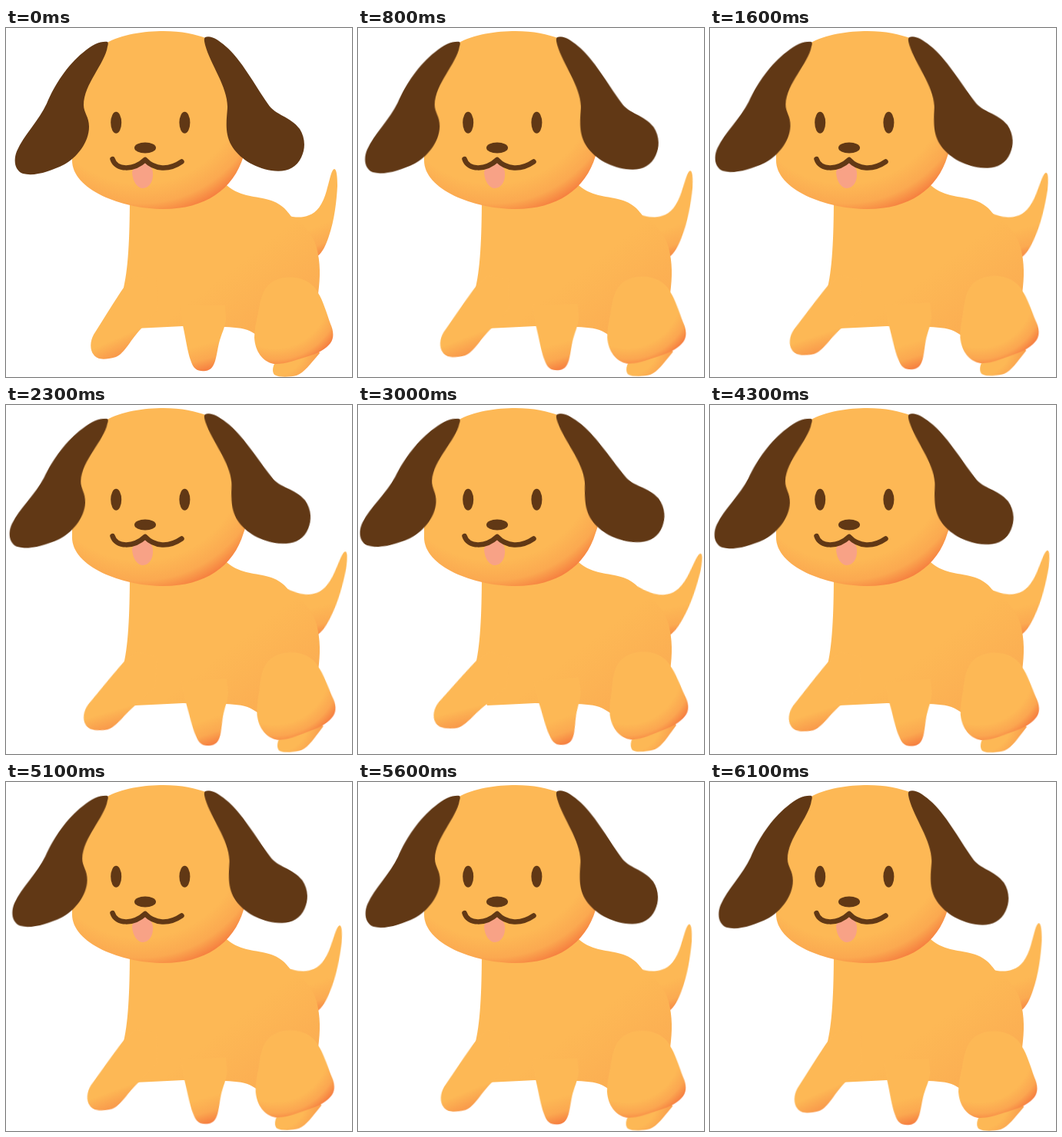
An HTML page that plays this animation: 450x453 px, repeating every 6200 ms.

```html
<!DOCTYPE html>
<html lang="en">
<head>
<meta charset="utf-8">
<title>Puppy</title>
<style>
  html, body { margin: 0; width: 100%; height: 100%; overflow: hidden; background: #fff; }
  svg { display: block; width: 100%; height: 100%; }

  /* Every limb swings linearly out and back, ten poses per second. */
  .sway { animation: sway 6.2s steps(31) infinite; }
  @keyframes sway {
    0%, 100% { transform: rotate(0deg); }
    50% { transform: rotate(var(--a)); }
  }
  .tail      { --a: 11deg;   transform-origin: 384px 288px; }
  .hind      { --a: -4.6deg; transform-origin: 330px 343px; }
  .fore-near { --a: 10deg;   transform-origin: 181px 338px; }
  .fore-far  { --a: -5.6deg; transform-origin: 217px 336px; }
  .ear-left  { --a: 3.6deg;  transform-origin: 129px 20px; }
  .ear-right { --a: -4.7deg; transform-origin: 263px 15px; }
  .dark { fill: #613815; }
</style>
</head>
<body>
<svg viewBox="0 0 450 453">
  <defs>
    <radialGradient id="headFill" gradientUnits="userSpaceOnUse" cx="175" cy="65" r="185">
      <stop offset=".74" stop-color="#fdb855"/>
      <stop offset=".88" stop-color="#fba950"/>
      <stop offset="1" stop-color="#f4743b"/>
    </radialGradient>
    <radialGradient id="thighFill" gradientUnits="userSpaceOnUse" cx="350" cy="346" r="97">
      <stop offset=".72" stop-color="#fdb855"/>
      <stop offset=".87" stop-color="#fba650"/>
      <stop offset="1" stop-color="#f5783e"/>
    </radialGradient>
    <radialGradient id="footFill" gradientUnits="userSpaceOnUse" cx="350" cy="412" r="60">
      <stop offset=".65" stop-color="#fdb855"/>
      <stop offset="1" stop-color="#f99a4b"/>
    </radialGradient>
    <linearGradient id="tailFill" gradientUnits="userSpaceOnUse" x1="398" y1="255" x2="416" y2="298">
      <stop offset=".1" stop-color="#fdb855"/>
      <stop offset=".6" stop-color="#fbaa51"/>
      <stop offset="1" stop-color="#f5793e"/>
    </linearGradient>
    <linearGradient id="nearFill" gradientUnits="userSpaceOnUse" x1="130" y1="396" x2="146" y2="432">
      <stop offset=".3" stop-color="#fdb855"/>
      <stop offset="1" stop-color="#f79048"/>
    </linearGradient>
    <linearGradient id="farFill" gradientUnits="userSpaceOnUse" x1="250" y1="400" x2="262" y2="446">
      <stop offset=".25" stop-color="#fdb855"/>
      <stop offset=".65" stop-color="#fba850"/>
      <stop offset="1" stop-color="#f5793e"/>
    </linearGradient>
    <linearGradient id="bodyFill" gradientUnits="userSpaceOnUse" x1="270" y1="310" x2="340" y2="400">
      <stop offset=".15" stop-color="#fdb855"/>
      <stop offset="1" stop-color="#fbad52"/>
    </linearGradient>
  </defs>

  <path class="sway tail" fill="url(#tailFill)" d="M427 183C423 184 421 198 417 211C412 229 404 240 394 243C387 246 380 246 373 245C366 244 360 242 354 240L362 272L390 296L405 296C411 293 417 280 420 270C427 250 430 225 431 205C431 193 430 183 427 183Z"/>

  <path class="sway hind" fill="url(#footFill)" d="M352 432C346 438 346 447 349 450C355 454 370 453 378 451C388 447 395 437 408 422L400 405L365 410Z"/>

  <path fill="url(#bodyFill)" d="M161 215C161 260 160 308 153 337L158 360L168 390C190 389 210 388 230 387L285 388C300 389 312 389 322 396L345 410L398 380L406 345C409 322 409 305 404 285C399 268 389 256 372 246C365 237 359 227 338 222C315 217 300 217 285 202Z"/>

  <path class="sway fore-near" fill="url(#nearFill)" d="M167 322L153 337C142 353 128 376 114 398C109 407 109 418 114 424C119 431 128 431 143 427C154 423 163 403 176 390L198 364L195 325Z"/>

  <path class="sway fore-far" fill="url(#farFill)" d="M226 360L230 386C234 404 236 420 240 431C244 444 250 446 260 445C273 443 273 426 277 409C280 397 285 389 286 378L285 360Z"/>

  <path class="sway hind" fill="url(#thighFill)" d="M349 328C335 335 331 351 328 370C325 382 323 392 323 402C324 420 334 433 348 436C362 437 376 431 390 427C405 423 417 416 422 409C427 402 426 393 422 384C417 370 412 353 406 344C398 325 368 318 349 328Z"/>

  <path fill="url(#headFill)" d="M130 20C150 8 180 4 205 4C228 4 247 8 262 14C286 28 315 75 314 130C314 148 313 156 309 166C296 210 258 235 205 235C150 235 84 209 86 170C86 100 100 45 130 20Z"/>

  <g class="dark">
    <path class="sway ear-left" d="M132 18C123 17 113 21 100 32C80 48 63 74 53 98C43 120 23 139 14 160C9 173 12 185 22 189C37 193 58 186 76 177C92 168 108 149 108 128C108 115 101 110 101 100C101 73 129 46 132 24C133 21 133 19 132 18Z"/>
    <path class="sway ear-right" d="M259 12C266 9 276 15 286 24C306 41 323 73 341 99C350 113 370 115 382 131C389 142 390 156 384 168C377 183 362 188 345 185C322 181 303 169 293 152C284 136 287 119 288 104C289 77 266 48 259 22C258 17 257 14 259 12Z"/>
    <ellipse cx="143.2" cy="122.8" rx="7" ry="14"/>
    <ellipse cx="232.4" cy="122.8" rx="7" ry="14"/>
    <ellipse cx="181" cy="155.5" rx="14" ry="7"/>
  </g>

  <path fill="#f8a286" d="M181 171C173 179 164 181 164 188C165 200 171 208 178 208C186 208 192 199 191 188C191 182 186 177 181 171Z"/>
  <path fill="none" stroke="#613815" stroke-width="6.5" stroke-linecap="round" stroke-linejoin="round" d="M138.500 170C143 185 166 185 181 171C193 184 212 185 228.500 173.500"/>
</svg>
</body>
</html>
```
